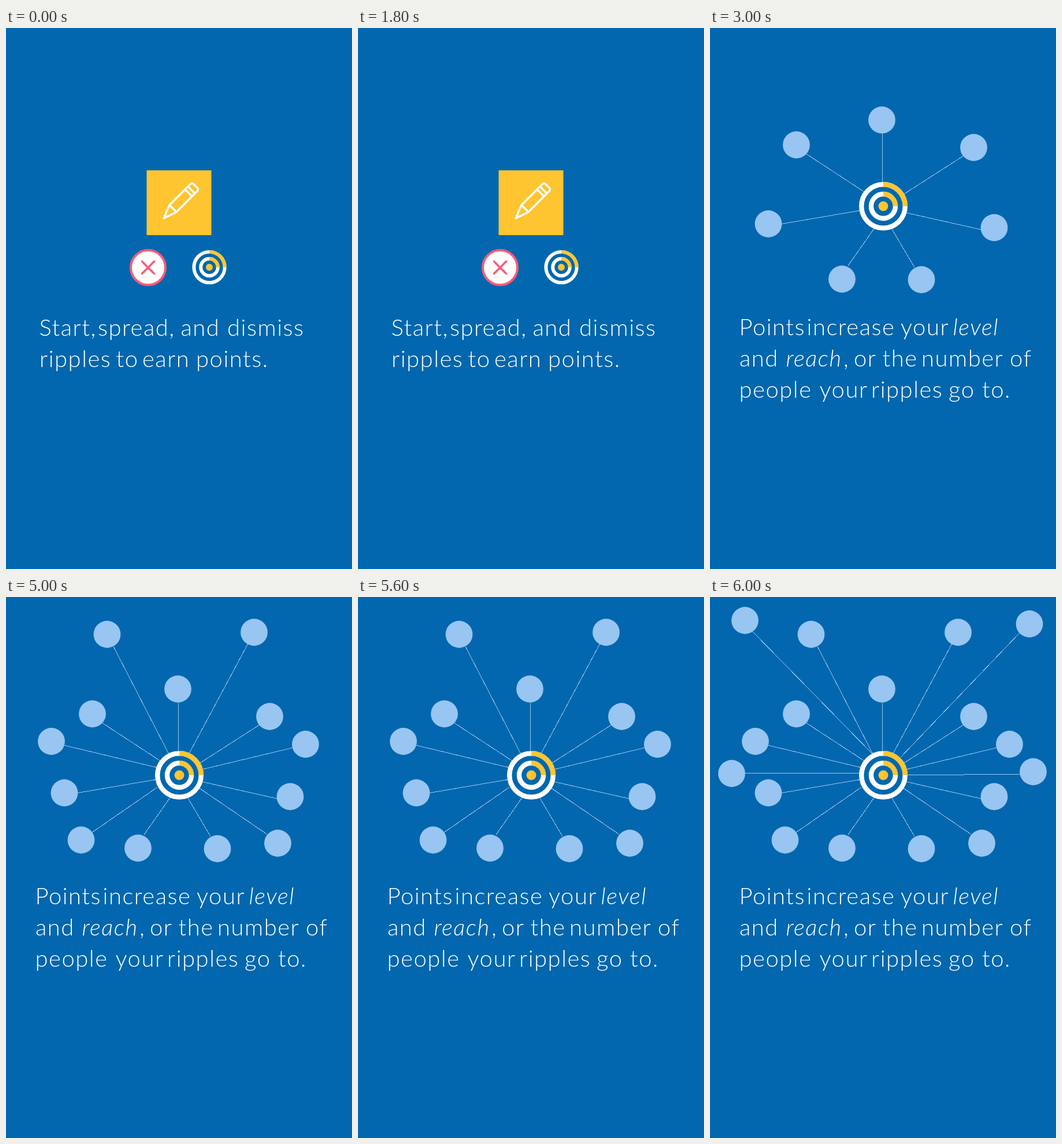
An HTML page for the animation above (7000 ms loop, 599x935 px).

```html
<!DOCTYPE html>
<html lang="en">
<head>
<meta charset="utf-8">
<title>Points and reach</title>
<style>
  html, body { margin: 0; width: 100%; height: 100%; overflow: hidden; background: #0267ae; }
  svg { display: block; width: 100vw; height: 100vh; }
  text { font: 300 40px Lato, "Open Sans", sans-serif; letter-spacing: 1.5px; fill: #fff; }
  .it { font-style: italic; }
  .node { fill: #98c5f2; }
  .link { stroke: #98c5f2; stroke-width: 1; shape-rendering: crispEdges; }
  .pen { fill: none; stroke: #fff; stroke-width: 3.2; stroke-linejoin: round; stroke-linecap: round; }
  .cross { fill: none; stroke: #ff5a78; stroke-width: 3.6; stroke-linecap: round; }
</style>
</head>
<body>
<svg viewBox="0 0 599 935">
  <g id="intro">
    <rect x="243.5" y="246" width="112" height="112" fill="#fec530"/>
    <path class="pen" d="M273 329L283 306L319 270Q322 267 325 270L331 276Q334 279 331 282L295 318ZM283 306L295 318M310 279L322 291M315 274L327 286"/>
    <path d="M272 330l3-8 5 5z" fill="#fff"/>
    <circle cx="246" cy="414" r="30" fill="#fff" stroke="#ff5a78" stroke-width="4"/>
    <path class="cross" d="M235.5 403.5l21 21m0-21l-21 21"/>
  </g>
  <g id="reach"></g>
  <g id="ring2"></g>
  <g id="ring3"></g>
  <g id="hub"></g>
</svg>
<script>
const LOOP = 7000;
const NS = 'http://www.w3.org/2000/svg';
const $ = id => document.getElementById(id);

function add(parent, tag, attrs, text = '') {
  const el = document.createElementNS(NS, tag);
  for (const k in attrs) el.setAttribute(k, attrs[k]);
  el.textContent = text;
  return parent.appendChild(el);
}

// Five equal bands with the upper right quarter in yellow
function target(g, cx, cy, r) {
  const band = r / 5;
  add(g, 'circle', { cx, cy, r: r - 0.5, fill: '#0267ae' });
  for (const k of [4.5, 2.5]) {
    const q = k * band;
    const line = { fill: 'none', 'stroke-width': band };
    add(g, 'circle', { cx, cy, r: q, stroke: '#fff', ...line });
    add(g, 'path', { d: `M${cx} ${cy - q}a${q} ${q} 0 0 1 ${q} ${q}`, stroke: '#fec530', ...line });
  }
  add(g, 'circle', { cx, cy, r: band, fill: '#fec530' });
}

// Each row: node centre, link start, link end
function nodes(g, rows) {
  for (const [, , x1, y1, x2, y2] of rows)
    add(g, 'line', { class: 'link', x1: x1 + 0.5, y1: y1 + 0.5, x2: x2 + 0.5, y2: y2 + 0.5 });
  for (const [cx, cy] of rows) add(g, 'circle', { class: 'node', cx, cy, r: 23.4 });
}

// Words as [x, word]; a leading * marks italics
function line(g, y, words) {
  const t = add(g, 'text', { y });
  for (const [x, w] of words) {
    const it = w[0] === '*';
    add(t, 'tspan', { x, class: it ? 'it' : '' }, it ? w.slice(1) : w);
  }
}

target($('intro'), 352, 413.5, 29.6);
line($('intro'), 532, [[57.5, 'Start,'], [159, 'spread,'], [302.5, 'and'], [383, 'dismiss']]);
line($('intro'), 586, [[58, 'ripples'], [190.5, 'to'], [236, 'earn'], [329, 'points.']]);

nodes($('reach'), [
  [297.5, 159, 298, 182, 298, 270],
  [149.5, 202, 166, 217, 267, 283],
  [456.5, 206.5, 439, 220, 336, 286],
  [101, 338.5, 124, 338, 259, 315],
  [492, 345, 469, 348, 340, 319],
  [228.5, 434, 238, 411, 283, 347],
  [366, 435, 354, 414, 315, 348]
]);
line($('reach'), 531, [[50.5, 'Points'], [167.5, 'increase'], [330, 'your'], [420.5, '*level']]);
line($('reach'), 585, [[51, 'and'], [131.5, '*reach'], [231, ','], [249, 'or'], [298.5, 'the'], [366, 'number'], [519, 'of']]);
line($('reach'), 639, [[50.5, 'people'], [189.5, 'your'], [279, 'ripples'], [413, 'go'], [471, 'to.']]);

nodes($('ring2'), [
  [175, 64.5, 186, 86, 281, 270],
  [429.5, 61, 418, 81, 317, 269],
  [78.5, 249.5, 101, 256, 260, 294],
  [518.5, 254.5, 496, 260, 341, 297],
  [130, 420, 149, 406, 262, 328],
  [470.5, 425.5, 452, 410, 330, 327]
]);
nodes($('ring3'), [
  [60.5, 40.5, 73, 59, 282, 272],
  [553, 46.5, 535, 62, 329, 277],
  [37.5, 305, 60, 304, 258, 304],
  [559.5, 302, 537, 306, 342, 307]
]);
target($('hub'), 300, 308, 42);

// Visible span of each group in ms
const spans = {
  intro: [0, 3000],
  reach: [3000, LOOP],
  ring2: [5000, LOOP],
  ring3: [6000, LOOP],
  hub: [3000, LOOP]
};
for (const [id, [from, to]] of Object.entries(spans)) {
  const cuts = [...new Set([0, from, to, LOOP])];
  const steps = cuts.map(t => ({
    offset: t / LOOP,
    opacity: t >= from && t < to ? 1 : 0,
    easing: 'steps(1, end)'
  }));
  $(id).animate(steps, { duration: LOOP, iterations: Infinity });
}
</script>
</body>
</html>
```
